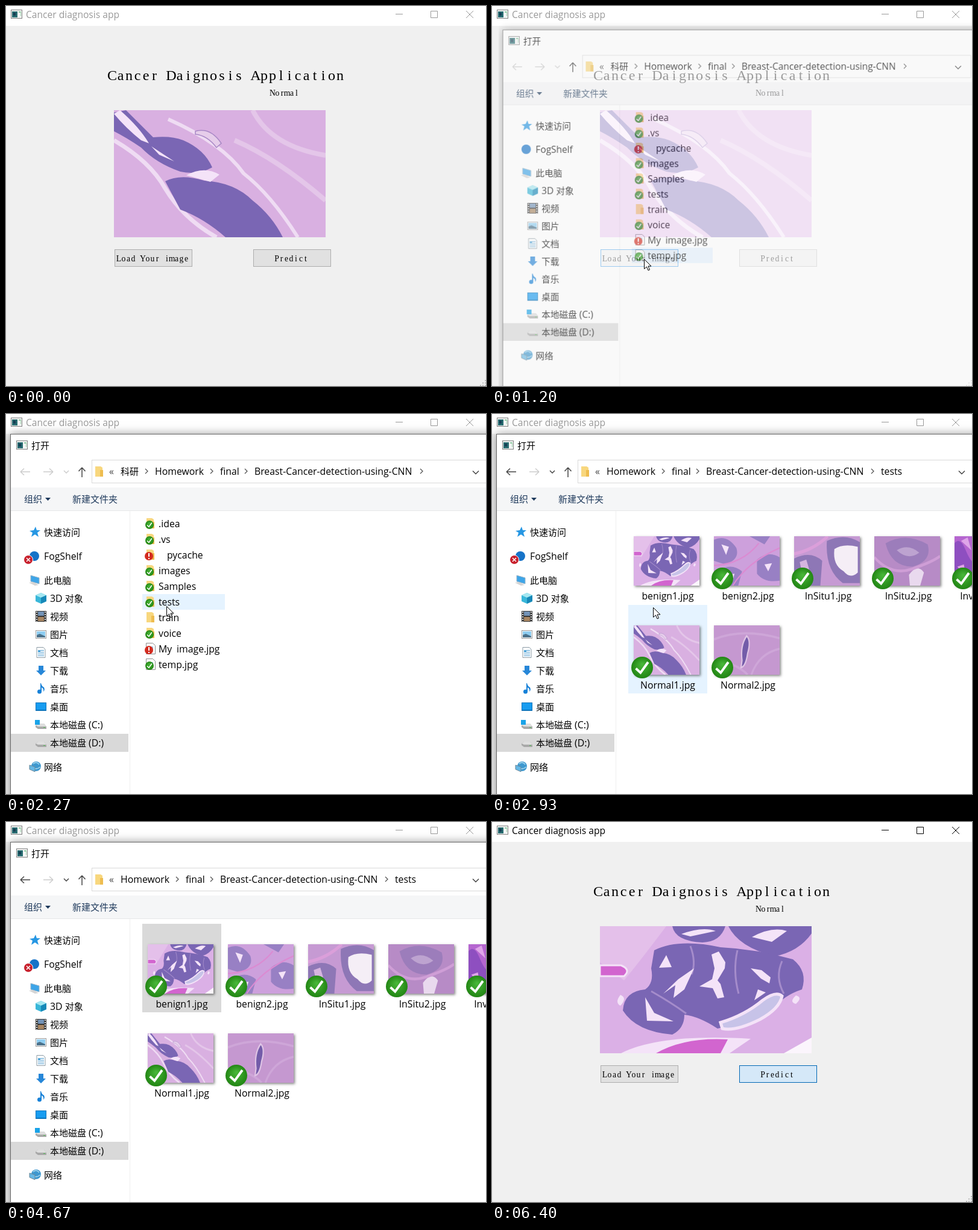
Write an HTML page with a canvas that moves like this. It is 796x631 px and loops after 8 s.

```html
<!DOCTYPE html>
<html lang="en">
<head>
<meta charset="utf-8">
<title>Cancer diagnosis app</title>
<style>
html, body { margin: 0; width: 100%; height: 100%; overflow: hidden; background: #f0f0f0; }
canvas { display: block; }
</style>
</head>
<body>
<canvas id="stage" width="796" height="631"></canvas>
<script>
const LOOP = 8000, FPS = 15;
const stage = document.getElementById('stage').getContext('2d');
const layerCanvas = Object.assign(document.createElement('canvas'), { width: 1010, height: 720 });
const layer = layerCanvas.getContext('2d');
let g = stage;

// ---- drawing helpers ----
const clamp = v => Math.max(0, Math.min(1, v));

function rect(x, y, w, h, fill, border) {
  g.fillStyle = fill;
  g.fillRect(x, y, w, h);
  if (border) {
    g.strokeStyle = border;
    g.lineWidth = 1;
    g.strokeRect(x + .5, y + .5, w - 1, h - 1);
  }
}

function shape(path, fill, stroke, width = 1) {
  const p = new Path2D(path);
  if (fill) { g.fillStyle = fill; g.fill(p); }
  if (stroke) { g.strokeStyle = stroke; g.lineWidth = width; g.stroke(p); }
}

function disc(x, y, r, fill, border) {
  g.beginPath();
  g.arc(x, y, r, 0, 7);
  g.fillStyle = fill;
  g.fill();
  if (border) { g.strokeStyle = border; g.lineWidth = 1; g.stroke(); }
}

function at(x, y, draw, sx = 1, sy = sx) {
  g.save();
  g.translate(x, y);
  g.scale(sx, sy);
  draw();
  g.restore();
}

// Chinese runs are set slightly smaller than Latin ones.
function label(text, x, y, color = '#000', size = 15.8) {
  g.fillStyle = color;
  for (const run of text.split(/([\u4e00-\u9fff]+)/)) {
    g.font = /[\u4e00-\u9fff]/.test(run)
      ? '15px "Noto Sans CJK SC", "Noto Sans CJK", sans-serif'
      : size + 'px "Open Sans", sans-serif';
    g.fillText(run, x, y + 5.5);
    x += g.measureText(run).width;
  }
}

// Serif letters, each centred in a cell of equal pitch.
function mono(text, x, baseline, pitch) {
  g.font = pitch * 1.72 + 'px "Liberation Serif", serif';
  g.fillStyle = '#000';
  g.textAlign = 'center';
  [...text].forEach((letter, i) => g.fillText(letter, x + pitch * (i + .5), baseline));
  g.textAlign = 'left';
}

// ---- tissue pictures, on a 351 x 211 field ----
const DARK = '#7a66b4', PALE = '#f4e3f8', PINK = '#d265cf';
const photos = {
  normal1: ['#d9b0e1',
    ['M0 50Q60 85 85 130Q115 180 170 211', , '#efdcf3', 7],
    ['M90 15Q180 55 215 105Q260 140 305 211', , '#efdcf3', 6],
    ['M230 0Q260 60 351 75M200 50Q270 80 351 150', , '#e4c6e9', 8],
    ['M0 4L20 0Q45 25 65 45Q95 42 115 50Q150 65 163 95Q140 108 110 102Q70 88 45 62Q20 45 0 35Z', DARK],
    ['M85 118Q110 105 150 117Q200 120 230 150Q262 175 280 211H185Q150 180 110 165Z', DARK],
    ['M10 0Q42 28 58 55L45 50Q20 30 0 6Z', PALE],
    ['M62 60L100 85L75 74ZM120 108Q150 92 175 107L160 119Z', PALE],
    ['M135 35Q160 28 178 55L170 62Q155 42 135 40Z', '#e6cdea', '#a888c6', 1.5]],
  benign1: ['#dbb0e6',
    ['M0 0H110Q65 60 40 90L0 60Z', '#e4c0ea'],
    ['M120 0H208Q200 26 170 27Q125 25 120 0ZM213 0H351V12Q330 42 290 50Q230 35 213 0Z', DARK],
    ['M90 40Q130 20 200 35Q260 38 320 55Q345 75 335 105Q305 115 290 135Q240 160 195 170Q165 150 140 147Q140 170 120 180Q60 175 38 140Q40 108 75 105Q90 95 85 70Z', DARK],
    ['M150 33Q160 60 152 80M228 40Q220 75 230 112M302 58Q290 85 305 112M85 108Q120 128 143 145', , '#a58ccb', 3],
    ['M135 13Q170 0 192 8L150 17ZM252 18Q285 0 310 8L285 26Z', PALE],
    ['M185 47L197 42L208 60L207 70L195 90L200 96L206 118L195 120L187 103L165 100L186 88L190 70Z', PALE],
    ['M105 112L130 88L156 70L140 105L122 119L125 98ZM75 118L90 144L122 158L78 157ZM250 70L268 73L283 85L281 95L267 87ZM110 48L119 68L98 69ZM262 105L256 123L275 110Z', PALE],
    ['M200 160Q240 148 270 123Q292 107 302 116Q298 137 265 155Q225 175 203 170Z', '#c7c3e8', PALE, 5],
    ['M0 65H35Q52 72 40 83H0Z', PINK, PALE, 3],
    ['M35 211Q100 178 250 187L215 211Z', PALE],
    ['M93 211Q140 184 212 188L200 211Z', PINK],
    ['M351 185L305 211H351Z', '#fbf5fc'],
    ['M34 114q12 5 0 18q-10 -5 0 -18M325 115q12 3 0 14q-12 -3 0 -14', PALE]],
  benign2: ['#cda0dc',
    ['M0 15Q70 -10 120 50Q140 100 60 120L0 105ZM20 150Q90 110 150 150L130 211H20ZM230 100Q290 60 351 90V190Q270 200 230 160ZM190 0H300L270 35Z', '#9880c4'],
    ['M40 35L80 45L65 80ZM60 165L110 160L100 190ZM270 120L310 115L290 150Z', PALE],
    ['M100 211Q180 110 351 50M0 125Q150 120 240 30', , '#db8bd2', 6]],
  insitu1: ['#c69ad3',
    ['M0 95Q90 60 150 105L140 211H0ZM175 20Q270 -15 351 25V200H260Q165 145 175 20Z', '#8e77b6'],
    ['M30 110L65 100L80 140L45 165Z', '#d6b5df'],
    ['M215 55Q260 30 340 45V155Q300 185 265 150Q205 125 215 55Z', '#f5eef6'],
    ['M0 75Q100 60 180 0', , '#db9fda', 14]],
  insitu2: ['#b78bc6',
    ['M60 30Q170 -20 285 35Q310 105 205 130Q90 130 60 30Z', '#9c7dbb'],
    ['M120 60Q180 30 240 70Q180 105 120 60Z', '#bda3d0'],
    ['M185 165Q230 115 265 155L245 211H190Z', '#e9d9ee'],
    ['M0 90Q90 170 200 140T351 85', , '#cf9ed6', 12],
    ['M20 140Q70 120 100 180L60 211H20Z', '#8c6daf']],
  invasive1: ['#b566d0',
    ['M0 30Q30 0 60 60T120 120T60 211H0Z', '#8e4fc0'],
    ['M35 20L70 5L90 60ZM15 130L50 120L60 170Z', '#dfa5e8']],
  normal2: ['#c598d0',
    ['M0 60Q150 10 351 55M0 150Q120 160 180 211M200 211Q240 120 351 100', , '#cea6d8', 10],
    ['M150 150Q140 85 175 45Q200 65 180 120Q170 175 145 180Z', '#735ca9', '#dfc4e5', 7]]
};

function photo(name, x, y, w, h) {
  g.save();
  g.beginPath();
  g.rect(x, y, w, h);
  g.clip();
  const [ground, ...parts] = photos[name];
  rect(x, y, w, h, ground);
  at(x, y, () => parts.forEach(p => shape(...p)), w / 351, h / 211);
  g.restore();
}

// ---- icons ----
function appIcon(x, y) {
  rect(x, y, 19, 15, '#f4f6f5', '#808080');
  rect(x + 2, y + 3, 9, 10, '#276b70');
  rect(x + 4, y + 5, 4, 5, '#173f55');
  rect(x + 13, y + 3, 3, 2, '#8ec9a0');
  rect(x + 16, y + 3, 1, 8, '#9ed0ad');
}

function folder(x, y) {
  shape(`M${x} ${y}h9l3 2v15h-12z`, '#f8d77e');
  shape(`M${x + 8} ${y + 6}h5v11h-5z`, '#eebd50');
}

function page(x, y) {
  shape(`M${x + .5} ${y + .5}h11l4 4v14h-15z`, '#fff', '#8c8c8c');
  rect(x + 3, y + 6, 9, 7, '#9ecbed');
}

function tick(x, y, r) {
  const glow = g.createRadialGradient(x, y - r / 3, 0, x, y, r);
  glow.addColorStop(0, '#49b83a');
  glow.addColorStop(1, '#228614');
  disc(x, y, r, glow);
  at(x, y, () => shape('M-.58 .08L-.15 .48L.55 -.5', null, '#fff', .22), r);
}

function alertMark(x, y) {
  disc(x, y, 7, '#d32c20');
  rect(x - 1, y - 5, 2, 6, '#fff');
  rect(x - 1, y + 3, 2, 2, '#fff');
}

function drive() {
  shape('M-9 1L-5 -2H5L9 3V7H-5L-9 4Z', '#a9a9a9');
  shape('M-9 1L-5 -2H5L9 3H-5Z', '#dedede');
  rect(4, 4, 3, 1, '#4fc04f');
}

const icons = {
  star: () => shape('M1 -9L3 -3H9L4 1L6 8L0 4L-6 8L-4 1L-9 -2L-2 -3Z', '#2797e3'),
  cloud: () => disc(-1, 0, 8, '#1673c8'),
  pc: () => {
    shape('M-7 -8L7 -4V6L-7 2Z', '#3da5e8', '#9ab5c7');
    shape('M-10 4L-3 3L6 8L0 9Z', '#d4d4d4');
  },
  cube: () => {
    shape('M0 -9L9 -5V5L0 9L-9 5V-5Z', '#39b7d9');
    shape('M0 -9L9 -5L0 -1L-9 -5Z', '#a5e7f1');
    shape('M0 -1L9 -5V5L0 9Z', '#1688b8');
  },
  film: () => {
    rect(-9, -9, 18, 18, '#383838');
    for (let y = -8; y < 9; y += 4) { rect(-8, y, 2, 2, '#ddd'); rect(6, y, 2, 2, '#ddd'); }
    rect(-5, -8, 10, 7, '#7393b7');
    rect(-5, 1, 10, 7, '#a88662');
  },
  picture: () => {
    rect(-9, -7, 18, 14, '#fff', '#999');
    rect(-7, -5, 14, 10, '#8ecdf1');
    shape('M-7 5V1L-2 -1L7 3V5Z', '#4b718a');
  },
  doc: () => {
    shape('M-7 -8.5H4L7 -5V8.5H-7Z', '#fff', '#8c9ba5');
    for (let y = -4; y < 7; y += 3) rect(-5, y, 10, 1, '#4a9bd0');
    rect(-5, -4, 4, 4, '#5aa9da');
  },
  down: () => shape('M-4 -8H4V0H8L0 8L-8 0H-4Z', '#2787d8'),
  note: () => {
    shape('M0 -9Q1 -4 5 -2Q7 2 4 5Q5 0 1 -2V5H-1V-9Z', '#1681d8');
    disc(-2.5, 5, 3.5, '#1681d8');
  },
  desk: () => { rect(-9, -7, 18, 14, '#179cf0', '#0873bb'); rect(-9, 5, 18, 2, '#0873bb'); },
  system: () => { drive(); rect(-10, -8, 8, 8, '#1aa3e8'); },
  drive,
  net: () => {
    disc(2, -1, 8, '#3e98cf');
    shape('M-3 -5Q2 -10 7 -4M-5 2Q3 5 9 0', null, '#a9d9ef', 1.5);
    shape('M-9 -3L0 0V8L-9 4Z', '#65b8e6', '#6c8797');
  }
};

function chevron(x, y, size, color) {
  shape(`M${x - size} ${y - size / 2}l${size} ${size}l${size} ${-size}`, null, color, 1.5);
}

function arrow(x, y, angle, color) {
  g.save();
  g.translate(x, y);
  g.rotate(angle);
  shape('M-8 0H8M-8 0L-2 -5.5M-8 0L-2 5.5', null, color, 1.5);
  g.restore();
}

// ---- main window ----
function button(text, x, textX, fill = '#e1e1e1', border = '#adadad') {
  rect(x, 404, 129, 29, fill, border);
  mono(text, textX, 424, 8);
}

function mainWindow(T, mouse) {
  const active = (T > 260 && T < 1120) || (T > 4720 && !(T > 6260 && T < 6390));
  const ink = active ? '#000' : '#999';
  rect(0, 0, 796, 631, '#f0f0f0');
  rect(0, 0, 796, 33, '#fff');
  appIcon(8, 6);
  label('Cancer diagnosis app', 33, 14, ink, 15.6);
  shape('M646 13.5h12M704.5 8.5h11v11h-11zM763 8l12 12M775 8l-12 12', null, ink);

  mono('Cancer Daignosis Application', 169, 123, 14);
  mono('Normal', 438, 149, 8);
  photo(T > 4860 ? 'benign1' : 'normal1', 179, 173, 351, 211);

  const overLoad = T < 1120 && mouse && mouse.x > 180 && mouse.x < 309 && mouse.y > 404 && mouse.y < 433;
  if (overLoad) button('Load Your image', 180, 183, '#e5f1fb', '#0078d7');
  else button('Load Your image', 180, 183, '#e1e1e1', T > 1120 && T < 4800 ? '#0078d7' : '#adadad');
  if (T > 6390) button('Predict', 410, 445, '#d5e8f8', '#0067b4');
  else button('Predict', 410, 445);

  for (let i = 0; i < 3; i++)
    for (let j = 0; j <= i; j++) rect(794 - 4 * j, 621 + 4 * i, 2, 2, '#bdbdbd');
}

// ---- file dialog ----
const sidebar = [
  ['star', '快速访问', 63, 196], ['cloud', 'FogShelf', 63, 236], ['pc', '此电脑', 63, 276],
  ...[['cube', '3D 对象'], ['film', '视频'], ['picture', '图片'], ['doc', '文档'], ['down', '下载'],
    ['note', '音乐'], ['desk', '桌面'], ['system', '本地磁盘 (C:)'], ['drive', '本地磁盘 (D:)']
  ].map(([icon, text], i) => [icon, text, 73, 306 + 30 * i]),
  ['net', '网络', 63, 586]
];
const files = ['.idea', '.vs', 'pycache', 'images', 'Samples', 'tests', 'train', 'voice', 'My image.jpg', 'temp.jpg'];
const tiles = ['benign1', 'benign2', 'InSitu1', 'InSitu2', 'Invasive1', 'Normal1', 'Normal2'];
const rootCrumbs = [['科研', 190], ['Homework', 247], ['final', 355], ['Breast-Cancer-detection-using-CNN', 412], ['', 703]];
const testCrumbs = [['Homework', 190], ['final', 298], ['Breast-Cancer-detection-using-CNN', 355], ['tests', 645]];

function fileList(T, mouse) {
  files.forEach((name, i) => {
    const y = 182 + 26 * i;
    const hover = mouse && Math.floor((mouse.y - 169) / 26) === i;
    if (hover) rect(226, y - 13, 137, 26, T > 2660 ? '#cce8ff' : '#e5f3ff');
    if (i < 8) folder(233, y - 9); else page(232, y - 10);
    if (i === 2 || i === 8) alertMark(237, y + 2);
    else if (i !== 6) tick(238, y + 2, 7);
    if (i === 8) { label('My', 253, y); label('image.jpg', 283, y); }
    else label(name, i === 2 ? 267 : 253, y);
  });
}

function tileGrid(T, mouse) {
  tiles.forEach((name, i) => {
    const x = 226 + 133 * (i % 5), y = i < 5 ? 169 : 317;
    const hover = mouse && mouse.x >= x && mouse.x < x + 131 && mouse.y >= y && mouse.y < y + 147;
    if (i === 0 && T > 3520) rect(x, y, 131, 147, T > 4660 ? '#d9d9d9' : '#cce8ff');
    else if (hover) rect(x, y, 131, 147, '#e5f3ff');
    g.save();
    g.shadowColor = '#0007';
    g.shadowBlur = 4;
    g.shadowOffsetX = g.shadowOffsetY = 2;
    rect(x + 9, y + 34, 109, 82, '#ccc');
    g.restore();
    photo(name.toLowerCase(), x + 9, y + 34, 109, 82);
    if (i > 0 || T > 2990) tick(x + 23, y + 104, 18);
    g.textAlign = 'center';
    label(name + '.jpg', x + 65.5, y + 133);
    g.textAlign = 'left';
  });
}

function dialog(T, mouse) {
  const inTests = T > 2920, navInk = inTests ? '#444' : '#ccc';
  g.clearRect(0, 0, 1010, 720);
  g.save();
  g.shadowColor = '#0006';
  g.shadowBlur = 14;
  rect(7, 33, 979, 670, '#fff');
  g.restore();
  rect(7, 33, 979, 670, '#fff', '#666');

  appIcon(17, 44);
  label('打开', 42, 52);
  arrow(32, 96, 0, navInk);
  arrow(70, 96, Math.PI, '#ccc');
  chevron(100, 96, 4, navInk);
  arrow(126, 97, Math.PI / 2, '#444');
  rect(142, 76, 659, 39, '#fff', '#d9d9d9');
  folder(148, 87);
  label('«', 171, 95, '#444');
  (inTests ? testCrumbs : rootCrumbs).forEach(([text, x], i) => {
    if (i) shape(`M${x - 16} 91l4 4l-4 4`, null, '#555', 1.3);
    label(text, x, 95);
  });
  chevron(779, 97, 5, '#444');

  rect(8, 122, 977, 38, '#f5f6f7');
  rect(8, 160, 977, 1, '#e6e7e8');
  label('组织', 30, 141, '#1e395b');
  shape('M65 139h9l-4.5 5z', '#1e395b');
  label('新建文件夹', 110, 141, '#1e395b');

  rect(205, 161, 1, 540, '#efefef');
  rect(8, 531, 195, 30, '#d9d9d9');
  for (const [icon, text, x, y] of sidebar) {
    at(x - 15, y, icons[icon]);
    label(text, x, y);
  }
  g.globalAlpha = clamp((T - 1470) / 500);
  disc(37, 242, 7.5, '#c8202c', '#fff');
  shape('M34 239l6 6M40 239l-6 6', null, '#fff', 1.6);
  g.globalAlpha = 1;

  (inTests ? tileGrid : fileList)(T, mouse);
}

// ---- pointer: time, x, y ----
const moves = [
  [266, 420, 452], [1000, 253, 420], [1267, 253, 420], [1600, 261, 385], [1933, 264, 314],
  [2400, 268, 321], [3133, 268, 321], [3533, 283, 274], [3600, 283, 274], [4133, 758, 640]
];

function pointer(T) {
  if (T < 260 || T > 6260 || (T > 4130 && T < 5060)) return null;
  if (T > 5060) {
    const k = 1 - (1 - clamp((T - 5067) / 666)) ** 2.25;
    return { x: 764 - 145 * k, y: 532 - 317 * k };
  }
  const i = Math.max(1, moves.findIndex(m => m[0] >= T));
  const [t0, x0, y0] = moves[i - 1], [t1, x1, y1] = moves[i];
  const k = clamp((T - t0) / (t1 - t0));
  return { x: x0 + (x1 - x0) * k, y: y0 + (y1 - y0) * k };
}

function render(time) {
  const T = Math.floor((time + 3.4) * FPS / 1000) * 1000 / FPS;
  const mouse = pointer(T);
  g = stage;
  mainWindow(T, mouse);

  const opacity = T < 1120 ? 0 : T < 4660 ? clamp(.3 + (T - 1130) / 220) : clamp(1 - (T - 4667) / 200);
  if (opacity > 0) {
    g = layer;
    dialog(T, mouse);
    g = stage;
    const scale = 1 - .1 * (1 - opacity) ** 1.6;
    g.globalAlpha = opacity;
    at(497 * (1 - scale), 325 * (1 - scale), () => g.drawImage(layerCanvas, 0, 0), scale);
    g.globalAlpha = 1;
  }
  if (mouse) at(Math.round(mouse.x) - .5, Math.round(mouse.y) + .5,
    () => shape('M0 0V16L4 12.5L6.5 18.5L9 17.5L6.5 11.5H11.5Z', '#fff', '#000'));
}

const start = performance.now();
function loop() {
  render((performance.now() - start) % LOOP);
  requestAnimationFrame(loop);
}
loop();
</script>
</body>
</html>
```
